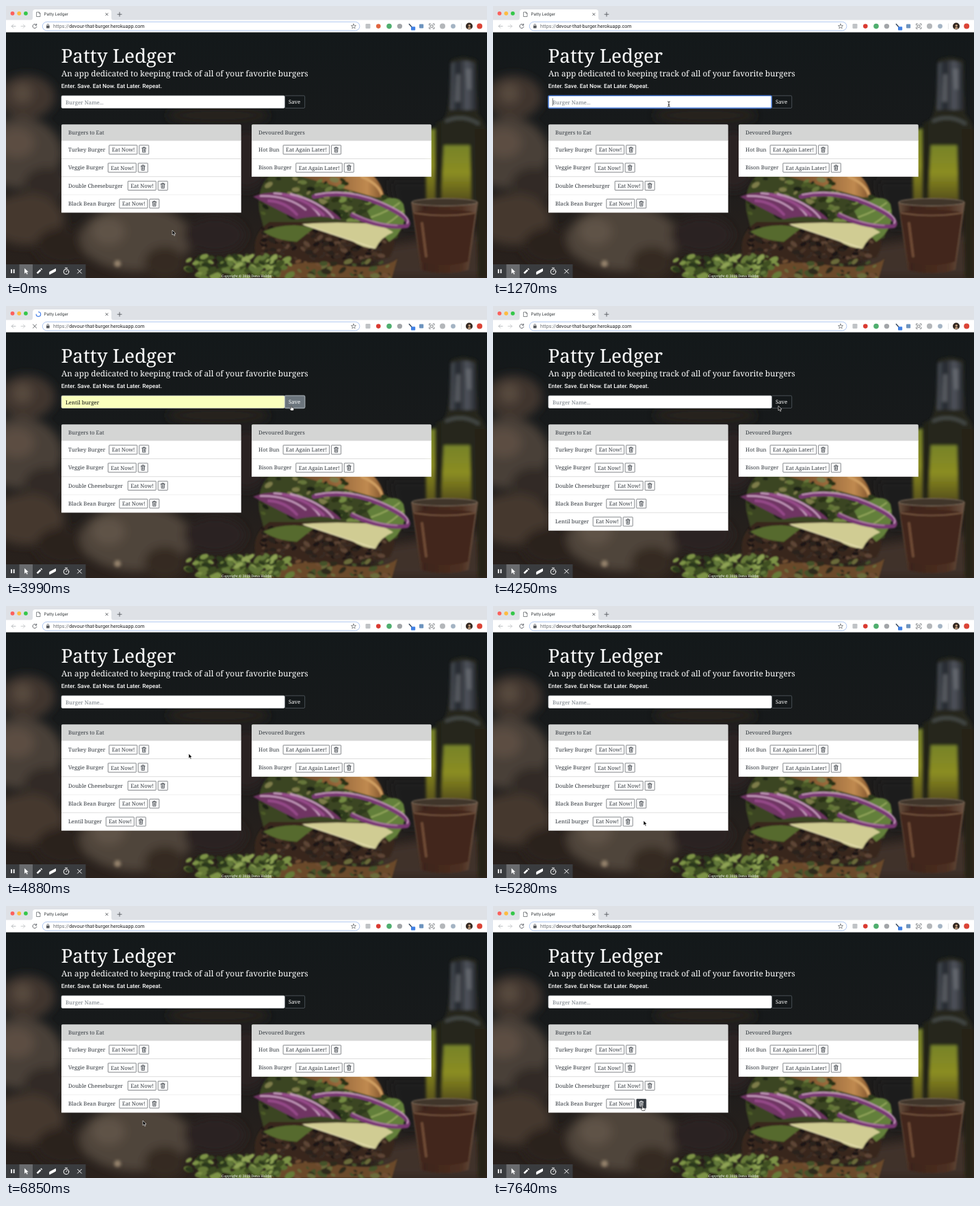
An HTML page for the animation above (8 s loop, 703 by 398 pixels).

```html
<!DOCTYPE html>
<html lang="en">
<head>
<meta charset="utf-8">
<title>Patty Ledger</title>
<style>
  html, body { margin: 0; width: 100%; height: 100%; overflow: hidden; background: #14181a; }
  svg { display: block; width: 703px; height: 398px; }
  text { font: 7.8px "Noto Serif", serif; text-rendering: geometricPrecision; white-space: pre; }
  .ui { font-family: Roboto, sans-serif; }
  .line { fill: none; stroke-linecap: round; stroke-linejoin: round; }
</style>
</head>
<body>
<svg id="stage" viewBox="0 0 703 398" xmlns="http://www.w3.org/2000/svg">
  <defs>
    <filter id="soft" x="-40%" y="-40%" width="180%" height="180%"><feGaussianBlur stdDeviation="7"/></filter>
    <filter id="mid" x="-30%" y="-30%" width="160%" height="160%"><feGaussianBlur stdDeviation="2"/></filter>
    <filter id="fine"><feGaussianBlur stdDeviation=".9"/></filter>
    <linearGradient id="wall" x2="0" y2="1">
      <stop offset="0" stop-color="#12181a"/><stop offset=".5" stop-color="#181a1b"/>
      <stop offset=".8" stop-color="#241f1c"/><stop offset="1" stop-color="#2a211c"/>
    </linearGradient>
    <linearGradient id="neck">
      <stop offset="0" stop-color="#4c5058"/><stop offset=".3" stop-color="#24282d"/>
      <stop offset=".65" stop-color="#50545c"/><stop offset="1" stop-color="#24272b"/>
    </linearGradient>
    <linearGradient id="liquid" x2="0" y2="1">
      <stop offset="0" stop-color="#77832a"/><stop offset=".5" stop-color="#8b8d22"/>
      <stop offset="1" stop-color="#57501b"/>
    </linearGradient>
    <linearGradient id="glass">
      <stop offset="0" stop-color="#67503f"/><stop offset=".2" stop-color="#3d241a"/>
      <stop offset=".75" stop-color="#4d3022"/><stop offset="1" stop-color="#6d5646"/>
    </linearGradient>
    <linearGradient id="bun">
      <stop offset="0" stop-color="#4c3320"/><stop offset=".55" stop-color="#8f6136"/>
      <stop offset=".85" stop-color="#c08a50"/><stop offset="1" stop-color="#7a4e29"/>
    </linearGradient>
  </defs>

  <!-- backdrop -->
  <rect width="703" height="398" fill="url(#wall)"/>
  <g filter="url(#soft)">
    <ellipse cx="310" cy="160" rx="75" ry="14" fill="#25221f"/>
    <ellipse cx="30" cy="133" rx="42" ry="32" fill="#40362f"/>
    <circle cx="24" cy="128" r="15" fill="#574a3e"/>
    <ellipse cx="20" cy="215" rx="62" ry="52" fill="#4a3f37"/>
    <ellipse cx="16" cy="200" rx="26" ry="22" fill="#5b4e43"/>
    <ellipse cx="60" cy="262" rx="34" ry="26" fill="#332b27"/>
    <ellipse cx="30" cy="312" rx="55" ry="38" fill="#44392f"/>
    <ellipse cx="85" cy="352" rx="42" ry="28" fill="#2a231f"/>
    <ellipse cx="190" cy="340" rx="82" ry="48" fill="#50443a"/>
    <ellipse cx="150" cy="330" rx="24" ry="20" fill="#5f5246"/>
    <ellipse cx="232" cy="376" rx="30" ry="24" fill="#352a23"/>
    <ellipse cx="305" cy="335" rx="45" ry="28" fill="#2b2420"/>
    <ellipse cx="352" cy="225" rx="34" ry="45" fill="#292421"/>
    <path d="M545 352L703 330V398H540Z" fill="#40322a"/>
    <path d="M560 255H640V330H575Z" fill="#1d1b1a"/>
  </g>
  <g filter="url(#mid)">
    <circle cx="163" cy="377" r="5" fill="#94826c"/>
    <path d="M650 80Q668 70 688 80L690 158Q703 172 703 190V300H616V205Q618 180 640 165Q649 156 650 80Z" fill="#25271f"/>
    <path d="M650 84Q668 76 686 84L688 152H649Z" fill="url(#neck)"/>
    <path d="M658 100H664V140H656ZM672 92H680V122H674Z" fill="#777a80" opacity=".55"/>
    <path d="M613 180H627V288H614Z" fill="url(#liquid)"/>
    <path d="M640 204H678L680 284H636Z" fill="url(#liquid)"/>
    <path d="M633 170V284" stroke="#222417" stroke-width="7"/>
    <path d="M685 180H703V398H690Z" fill="#272019"/>
    <path d="M644 168Q668 158 690 172" class="line" stroke="#454a46" stroke-width="5"/>
  </g>
  <g filter="url(#fine)">
    <path d="M592 287Q640 278 690 287L676 386Q642 396 606 386Z" fill="url(#glass)"/>
    <ellipse cx="641" cy="287" rx="48" ry="5.5" fill="#40352b" stroke="#80705f" stroke-width="1"/>
    <path d="M595 302Q640 294 686 302L675 374Q642 384 607 374Z" fill="#43281c"/>
    <path d="M597 303Q640 310 685 303" class="line" stroke="#72523e" stroke-width="2"/>
    <path d="M608 318L614 366" class="line" stroke="#6d4a35" stroke-width="4"/>
  </g>
  <g filter="url(#fine)">
    <path d="M380 290Q382 225 465 222Q548 230 554 284Z" fill="url(#bun)"/>
    <path d="M520 250Q548 262 550 280" class="line" stroke="#cf9d60" stroke-width="4"/>
    <path d="M370 300Q365 255 398 240L440 252L540 280Q575 278 583 300L572 340L530 350L380 338Z" fill="#3b4523"/>
    <g id="leaves"></g>
    <path d="M366 372Q356 335 385 316H555Q578 340 560 368Q470 390 366 372Z" fill="#37281f"/>
    <g id="meat"></g>
    <path d="M528 300Q568 268 581 290Q590 325 560 345Q540 325 528 300Z" fill="#64803a"/>
    <path d="M534 309Q560 300 575 288M550 322Q565 315 580 300" class="line" stroke="#96a95e" stroke-width="2"/>
    <path d="M376 330Q410 315 450 325L425 345Q395 343 376 330Z" fill="#566b2f"/>
    <path d="M432 319Q480 315 545 319L566 331Q548 338 540 355Q520 354 505 343Z" fill="#d0cc93"/>
    <path d="M436 320Q490 338 538 354" class="line" stroke="#e4deb1" stroke-width="1.5"/>
    <path d="M361 279Q395 265 438 282T490 313Q456 304 425 312Q400 300 361 279Z" fill="#703463"/>
    <path d="M372 278Q412 277 438 298M392 274Q436 276 458 306M416 275Q460 286 478 310" class="line" stroke="#c59bbd" stroke-width="2.4"/>
    <path d="M384 285Q408 286 425 305M405 276Q442 284 464 306" class="line" stroke="#944a88" stroke-width="4"/>
    <path d="M450 279Q500 268 548 290T586 322Q546 326 506 306" class="line" stroke="#793873" stroke-width="6"/>
    <path d="M452 276Q500 266 548 287T586 318" class="line" stroke="#c79abf" stroke-width="1.8"/>
    <path d="M506 303Q540 320 572 321" class="line" stroke="#b685ad" stroke-width="1.5"/>
    <path d="M375 398Q410 368 480 378T572 370L564 398Z" fill="#6b4a2c"/>
    <g id="frill"></g>
  </g>

  <!-- browser -->
  <rect width="703" height="22" fill="#dee1e6"/>
  <path d="M35 21Q39 21 39 17V9Q39 5 43 5H150Q154 5 154 9V17Q154 21 158 21Z" fill="#fff"/>
  <rect y="20.5" width="703" height="18" fill="#fff"/>
  <circle cx="9.5" cy="10.8" r="2.9" fill="#fc605c"/>
  <circle cx="19.2" cy="10.8" r="2.9" fill="#fdbc40"/>
  <circle cx="28.9" cy="10.8" r="2.9" fill="#34c749"/>
  <g class="line" stroke="#55595e" stroke-width=".9">
    <path id="doc" d="M45 9H48.3L50 10.8V15.5H45ZM48.3 9V10.8H50" stroke-width=".7"/>
    <path d="M145.7 10.5L149 13.8M149 10.5L145.7 13.8M163 12.2H169M166 9.2V15.2"/>
    <path d="M14 29.6H8.2M10.8 27L8.2 29.6L10.8 32.2" stroke="#b5b8bb"/>
    <path d="M22 29.6H27.8M25.2 27L27.8 29.6L25.2 32.2" stroke="#c6c8cb"/>
    <path id="reload" d="M44.4 27.7A3 3 0 1 0 44.9 30.4M44.7 26.2V28.2H42.7"/>
    <path id="stop" d="M39.4 27L44.6 32.2M44.6 27L39.4 32.2"/>
  </g>
  <path id="spin" class="line" d="M47.4 8.8A3.3 3.3 0 1 1 44.1 12.1" stroke="#3b78e7" stroke-width="1.1"/>
  <text class="ui" x="55.6" y="14.3" fill="#3c4043" style="font-size:6.3px">Patty Ledger</text>
  <rect x="53.3" y="23.2" width="463.6" height="12.8" rx="6.4" fill="#fff" stroke="#a4bfee" stroke-width=".9"/>
  <rect x="59" y="28.8" width="4.6" height="3.8" rx=".5" fill="#55595e"/>
  <path d="M60 29V27.8A1.3 1.3 0 0 1 62.6 27.8V29" class="line" stroke="#55595e" stroke-width=".8"/>
  <text class="ui" x="69" y="32.1" fill="#202124" style="font-size:7.19px"><tspan fill="#6a6e73">https://</tspan>devour-that-burger.herokuapp.com</text>
  <path d="M508 26.2L509 28.6L511.5 28.7L509.6 30.3L510.2 32.8L508 31.4L505.8 32.8L506.4 30.3L504.5 28.7L507 28.6Z" class="line" stroke="#5f6368" stroke-width=".7"/>
  <g id="addons">
    <rect x="525.5" y="26" width="7" height="7" rx="1.2" fill="#c0c3c6"/>
    <circle id="badge" cx="544.3" cy="29.6" r="3.3"/>
    <circle cx="560" cy="29.6" r="3.8" fill="#4fae6e"/>
    <circle cx="575.4" cy="29.6" r="3.7" fill="#a2a5a8"/>
    <path d="M589.3 26.6L592.8 30.4" class="line" stroke="#3b4d60" stroke-width="1.5"/>
    <rect x="592" y="30.3" width="6.2" height="5.3" rx=".8" fill="#3f80e5"/>
    <rect x="604" y="26.4" width="6.2" height="6.2" rx="1" fill="#6c93be"/>
    <path d="M618.5 28V26H620.5M624 26H626V28M626 31.2V33.2H624M620.5 33.2H618.5V31.2M620.5 28H624V31.2H620.5Z" class="line" stroke="#55595d" stroke-width=".7"/>
    <circle cx="638" cy="29.6" r="4" fill="#b3b6b9"/>
    <circle cx="653.5" cy="29.6" r="3.4" fill="#a3b3c3"/>
    <path d="M665.5 25.5V34" stroke="#d0d3d6" stroke-width=".6"/>
    <circle cx="677" cy="29.5" r="5" fill="#332821"/>
    <path d="M674.7 33.8Q675 30.8 677.3 30.8T680 33.5" fill="#bf9a7b"/>
    <circle cx="677.3" cy="28.8" r="1.7" fill="#bf9a7b"/>
    <circle cx="692.2" cy="29.5" r="4" fill="#db4437"/>
  </g>

  <!-- page -->
  <text x="80.5" y="83" fill="#fff" style="font-size:27.9px">Patty Ledger</text>
  <text x="81" y="102.8" fill="#fff" style="font-size:11.8px">An app dedicated to keeping track of all of your favorite burgers</text>
  <text class="ui" x="80.8" y="119.6" fill="#fff" style="font-size:8.41px;font-weight:500">Enter. Save. Eat Now. Eat Later. Repeat.</text>
  <rect id="save" x="407.3" y="131.2" width="29.4" height="18.2" rx="1.6"/>
  <rect id="field" x="81" y="131.2" width="326.2" height="18.2" rx="1.6"/>
  <text id="entry" x="87" y="143.6"></text>
  <path id="caret" d="M0 135V146" stroke="#222" stroke-width=".6"/>
  <text x="412.9" y="143.4" fill="#fff">Save</text>
  <g id="cards"></g>
  <text x="315" y="397" fill="#fff" style="font-size:5.1px">Copyright © 2019 Dena Holtby</text>

  <!-- recorder bar -->
  <rect y="378" width="116.5" height="20" fill="#3a3c3f"/>
  <rect x="19.5" y="378" width="19.5" height="20" fill="#696b6e"/>
  <g class="line" stroke="#fff" stroke-width="1">
    <path d="M8 385.3V391M11.6 385.3V391" stroke-width="1.8" stroke-linecap="butt"/>
    <path d="M27 383.7V391.7L29 389.8L30.6 392.8L31.8 392.1L30.2 389.2H32.8Z" fill="#fff" stroke="none"/>
    <path d="M45.5 391.2L50.6 386.1" stroke-width="2.6" stroke-linecap="butt"/>
    <path d="M51.3 385.4L52.3 384.4" stroke-width="2.6" stroke-linecap="butt"/>
    <path d="M64 389L72.5 384.5V388L64 392.5Z" fill="#fff"/>
    <circle cx="88" cy="388.8" r="3.8"/>
    <path d="M86.5 383.3H89.5M88 388.8L89.5 386.8"/>
    <path d="M104.6 385.3L110.4 391.1M110.4 385.3L104.6 391.1"/>
  </g>

  <g id="pointer">
    <path data-kind="arrow" d="M0 0V7L1.6 5.6L2.8 8.2L4 7.6L2.8 5.1H5Z" fill="#000" stroke="#fff" stroke-width=".6"/>
    <path data-kind="beam" d="M-1.5 -3.7Q0 -3.7 0 -2.7Q0 -3.7 1.5 -3.7M0 -2.7V2.7M-1.5 3.7Q0 3.7 0 2.7Q0 3.7 1.5 3.7M-.8 .9H.8" class="line" stroke="#111" stroke-width=".8"/>
    <path data-kind="hand" d="M-.7 0Q0 -.8 .7 0V2.6L3.3 3.2Q4 3.6 3.8 4.6L3.2 7H-.6L-2.6 4.4Q-2.6 3.2 -.7 4.3Z" fill="#fff" stroke="#111" stroke-width=".6"/>
  </g>
</svg>

<script>
const LOOP = 8000;
const $ = id => document.getElementById(id);
const show = (el, on) => el.setAttribute('visibility', on ? 'visible' : 'hidden');
const attrs = (el, map) => { for (const k in map) el.setAttribute(k, map[k]); };

// Seeded specks give the food its texture.
let seed = 7;
const rnd = () => (seed = seed * 16807 % 2147483647) / 2147483647;
function specks(id, n, x, y, w, h, r, colors) {
  let out = '';
  for (let i = 0; i < n; i++) {
    const px = x + rnd() * w, py = y + rnd() * h, rx = r * (.5 + rnd());
    const color = colors[Math.floor(rnd() * colors.length)];
    out += `<ellipse cx="${px}" cy="${py}" rx="${rx}" ry="${rx * .55}" fill="${color}" transform="rotate(${rnd() * 90 - 45} ${px} ${py})"/>`;
  }
  $(id).innerHTML += out;
}
specks('leaves', 70, 376, 248, 130, 60, 5, ['#293018', '#4b5a28', '#66763a', '#1f2416', '#7d7b4a']);
specks('leaves', 40, 490, 276, 80, 45, 5, ['#5a7033', '#2d3a1b', '#738a43']);
specks('meat', 150, 370, 322, 186, 48, 4.5, ['#1f1712', '#493427', '#5d4535', '#2c211b', '#382920']);
specks('frill', 50, 425, 372, 135, 26, 5, ['#45522a', '#6b6a3a', '#6f4e30', '#2e2a1c']);
specks('frill', 90, 266, 366, 155, 32, 6, ['#3a4a20', '#5a7030', '#7d9346', '#2b371b', '#667a38']);
specks('frill', 35, 318, 364, 85, 28, 5, ['#8ea254', '#62783a', '#3f5024']);

function button(x, y, w, label) {
  return `<rect x="${x}" y="${y}" width="${w}" height="13.2" rx=".6" fill="#fff" stroke="#343a40" stroke-width=".6"/>
    <text x="${x + 4}" y="${y + 9.5}" fill="#343a40">${label}</text>`;
}
function trash(id, x, y) {
  return `<g id="${id}"><rect x="${x}" y="${y}" width="14" height="13.2" rx=".6"/>
    <path class="line" stroke-width=".75" d="M${x + 4} ${y + 4.2}h6M${x + 5.8} ${y + 4}v-1.2h2.4v1.2M${x + 4.6} ${y + 4.2}l.4 6.2h4l.4 -6.2M${x + 6.2} ${y + 5.6}v3.4M${x + 7.8} ${y + 5.6}v3.4"/></g>`;
}
function card(id, x, title, label, bw, rows) {
  const top = 173.2, head = 24, rowH = 26.3, w = 262.7;
  const body = rows.map(([name, bx], i) => {
    const y = top + head + i * rowH;
    return `<g id="${id}${i}"><rect x="${x}" y="${y - .2}" width="${w}" height="${rowH + .2}" fill="#fff"/>
      <path d="M${x} ${y}h${w}" stroke="#dfdfdf" stroke-width=".5"/>
      <text x="${x + 10}" y="${y + 15.8}" fill="#343a40">${name}</text>
      ${button(bx, y + 6.5, bw, label)}${trash(id + 'bin' + i, bx + bw + 3, y + 6.5)}</g>`;
  }).join('');
  return `<path d="M${x} ${top + head}V${top + 1.6}q0 -1.6 1.6 -1.6h${w - 3.2}q1.6 0 1.6 1.6V${top + head}Z" fill="#d4d5d4"/>
    <text x="${x + 10}" y="188.2" fill="#343a40">${title}</text>${body}`;
}
$('cards').innerHTML =
  card('eat', 81, 'Burgers to Eat', 'Eat Now!', 41, [['Turkey Burger', 150.7], ['Veggie Burger', 149.2],
    ['Double Cheeseburger', 178.2], ['Black Bean Burger', 165.8], ['Lentil burger', 146.2]]) +
  card('done', 359, 'Devoured Burgers', 'Eat Again Later!', 67.5, [['Hot Bun', 405.1], ['Bison Burger', 423.8]]);

function paintBin(bin, hover, ring) {
  const [box, icon] = bin.children;
  attrs(box, { fill: hover ? '#343a40' : '#fff', stroke: ring ? '#6f9be0' : '#343a40', 'stroke-width': ring ? 1.8 : .6 });
  icon.setAttribute('stroke', hover ? '#fff' : '#343a40');
}
document.querySelectorAll('[id*=bin]').forEach(bin => paintBin(bin));

// [time, pointer kind, x, y, changes]; each step holds until the next.
const steps = [
  [0, 'arrow', 243, 328, { text: '', focus: 0, filled: 0, hover: 0, ring: 0, load: 0, lentil: 0, bin: -1, binRing: 0, badge: '#e0653f' }],
  [100, 'arrow', 243, 328, { badge: '#d93a30' }],
  [680, 'arrow', 255, 276],
  [825, 'arrow', 263, 190],
  [970, 'beam', 257, 143.5],
  [1270, 'beam', 257, 143.5, { focus: 1 }],
  [1440, 'none', 257, 143, { text: 'L' }],
  [1700, 'none', 257, 143, { text: 'Le' }],
  [1970, 'none', 257, 143, { text: 'Len' }],
  [2130, 'arrow', 238, 150],
  [2300, 'arrow', 190, 168],
  [2480, 'arrow', 150, 181, { text: 'Lentil burger', filled: 1 }],
  [2650, 'arrow', 148, 181],
  [2790, 'arrow', 172, 178],
  [2940, 'arrow', 250, 168],
  [3100, 'arrow', 338, 157],
  [3250, 'arrow', 398, 149],
  [3400, 'hand', 417, 146, { hover: 1 }],
  [3690, 'hand', 417, 146, { focus: 0, ring: 1 }],
  [3840, 'hand', 417, 146, { load: 1 }],
  [3990, 'hand', 417, 146, { load: 2 }],
  [4120, 'hand', 417, 146, { load: 3 }],
  [4250, 'arrow', 417, 146, { text: '', filled: 0, hover: 0, ring: 0, load: 0, lentil: 1 }],
  [4540, 'arrow', 390, 155],
  [4710, 'arrow', 325, 185],
  [4880, 'arrow', 267, 216],
  [5030, 'arrow', 236, 270],
  [5280, 'arrow', 220, 314],
  [5420, 'arrow', 211, 315],
  [5570, 'hand', 200, 314, { bin: 4 }],
  [6210, 'hand', 200, 314, { binRing: 1 }],
  [6350, 'hand', 200, 314, { load: 1 }],
  [6500, 'hand', 200, 314, { load: 2 }],
  [6660, 'arrow', 200, 314, { load: 0, lentil: 0, bin: -1, binRing: 0 }],
  [7010, 'arrow', 211, 312],
  [7170, 'arrow', 222, 307],
  [7350, 'arrow', 221, 302],
  [7490, 'hand', 219, 295, { bin: 3 }],
  [7640, 'hand', 218.5, 292.5]
];

let state = {};
const poses = steps.map(([t, kind, x, y, change]) => (state = { ...state, ...change, t, kind, x, y }));

function draw(s) {
  attrs($('pointer'), { transform: `translate(${s.x} ${s.y})` });
  for (const shape of $('pointer').children) show(shape, shape.dataset.kind === s.kind);

  attrs($('field'), {
    fill: s.filled ? '#faffbd' : '#fff',
    stroke: s.focus ? '#4f7fd6' : '#ced4da',
    'stroke-width': s.focus ? 1.6 : .6
  });
  const entry = $('entry');
  entry.textContent = s.text || 'Burger Name...';
  entry.setAttribute('fill', s.text ? '#111' : '#747c84');
  show($('caret'), s.focus);
  $('caret').setAttribute('transform', `translate(${87.2 + (s.text ? entry.getComputedTextLength() : 0)} 0)`);

  attrs($('save'), {
    fill: s.hover ? '#6c757d' : '#14181a',
    stroke: s.ring ? '#929aa1' : '#6c757d',
    'stroke-width': s.ring ? 1.6 : .6
  });
  show($('reload'), !s.load);
  show($('stop'), s.load);
  show($('doc'), !s.load);
  show($('spin'), s.load);
  attrs($('spin'), { transform: `rotate(${s.load * 130 - 260} 47.4 12.1)` });
  $('badge').setAttribute('fill', s.badge);

  $('eat4').style.display = s.lentil ? '' : 'none';
  for (const i of [3, 4]) paintBin($('eatbin' + i), s.bin === i, s.bin === i && s.binRing);
}

let last;
function tick() {
  const t = performance.now() % LOOP;
  const pose = poses.findLast(p => p.t <= t);
  if (pose !== last) draw(last = pose);
  requestAnimationFrame(tick);
}
tick();
</script>
</body>
</html>
```
